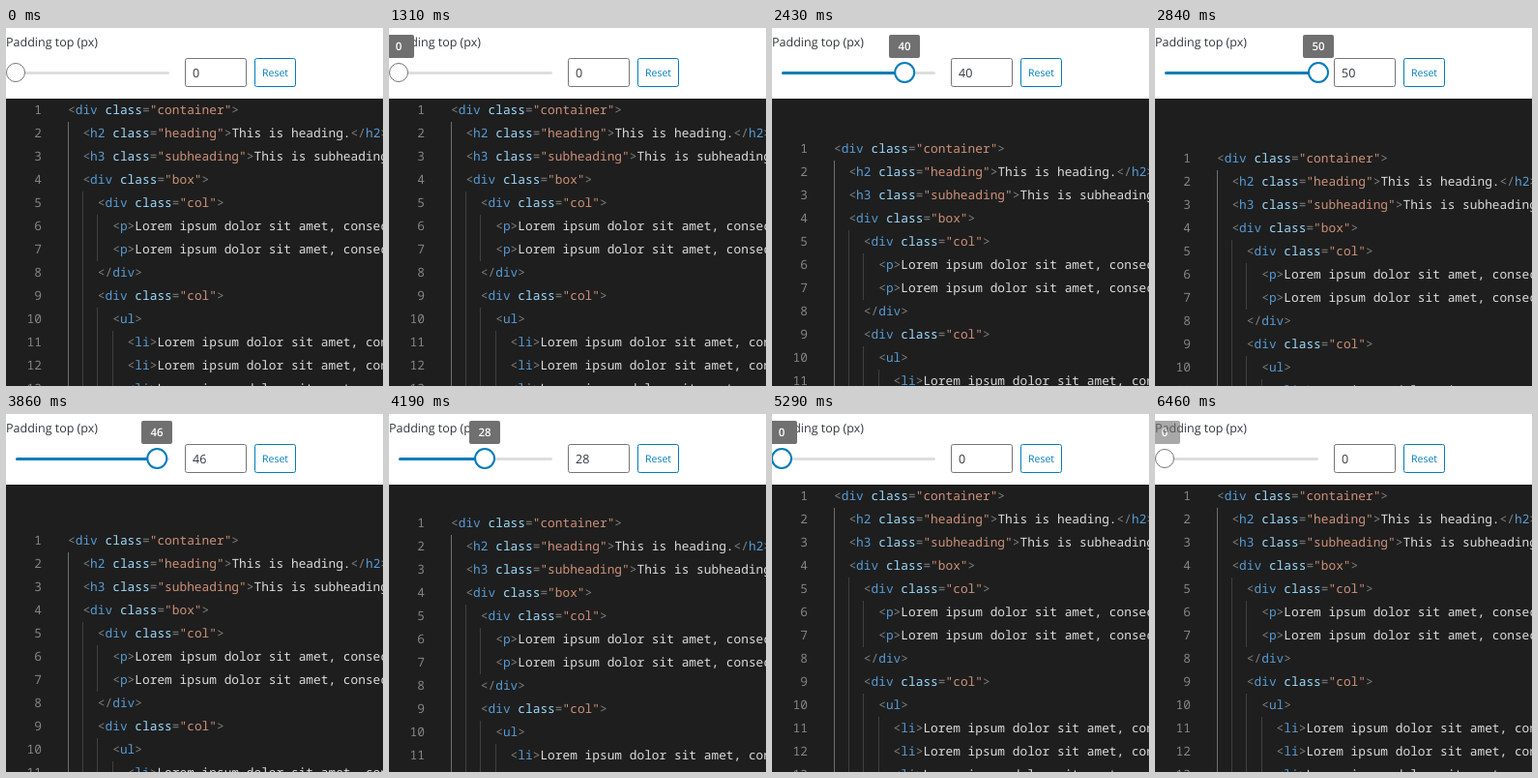
An HTML page for the animation above (6.49 s loop, 390 px wide and 370 px high).

```html
<!DOCTYPE html>
<html lang="en">
<head>
<meta charset="utf-8">
<title>Padding control</title>
<style>
  html, body { margin: 0; width: 100%; height: 100%; overflow: hidden; background: #fff; }
  svg { display: block; text-rendering: geometricPrecision; font: 12.5px "Open Sans", sans-serif; fill: #32373c; }
  #code { font: 12.83px "Noto Sans Mono", monospace; white-space: pre; }
  .num { fill: #858585; text-anchor: end; }
  .punct { fill: #808080; }
  .tag { fill: #569cd6; }
  .attr { fill: #9cdcfe; }
  .str { fill: #ce9178; }
  .text { fill: #dcdcdc; }
  .guide { fill: #404040; }
  .active { fill: #707070; }
  #tip text { font-size: 11.5px; font-weight: 600; fill: #fff; text-anchor: middle; }
</style>
</head>
<body>
<svg width="390" height="370" viewBox="0 0 390 370">
  <text x="0" y="19">Padding top (px)</text>

  <rect x="10" y="45" width="159" height="3" rx="1.5" fill="#ddd"/>
  <rect id="fill" x="10" y="45" height="3" rx="1.5" fill="#007cba"/>
  <circle id="thumb" cy="46" fill="#fff"/>

  <rect x="185.5" y="31.5" width="63" height="29" rx="2" fill="#fff" stroke="#757575"/>
  <text id="field" x="193" y="51"></text>
  <rect x="257.5" y="31.5" width="42" height="29" rx="2" fill="#fff" stroke="#007cba"/>
  <text x="265" y="50" font-size="10.5" style="fill:#007cba">Reset</text>

  <g id="tip">
    <rect x="-16" y="7" width="32" height="24" rx="2" fill="#707070"/>
    <text id="tipText" x="0" y="23"></text>
  </g>

  <rect y="73" width="390" height="297" fill="#1e1e1e"/>
  <g id="code"></g>
</svg>
<script>
const LOOP = 6490, ROW = 24, LEFT = 64, INDENT = 15.4;
const lorem = "Lorem ipsum dolor sit amet, consectetur";
const lines = [
  [0, '<div class="container">'],
  [1, '<h2 class="heading">This is heading.</h2>'],
  [1, '<h3 class="subheading">This is subheading.</h3>'],
  [1, '<div class="box">'],
  [2, '<div class="col">'],
  [3, `<p>${lorem}</p>`],
  [3, `<p>${lorem}</p>`],
  [2, '</div>'],
  [2, '<div class="col">'],
  [3, '<ul>'],
  [4, `<li>${lorem}</li>`],
  [4, `<li>${lorem}</li>`],
  [4, `<li>${lorem}</li>`]
];

const $ = id => document.getElementById(id);
const code = $("code"), fill = $("fill"), thumb = $("thumb"), tip = $("tip");

function add(parent, name, attrs, text = "") {
  const el = document.createElementNS("http://www.w3.org/2000/svg", name);
  for (const key in attrs) el.setAttribute(key, attrs[key]);
  el.textContent = text;
  return parent.appendChild(el);
}

const kinds = ["punct", "tag", "attr", "str", "text"];
const tokens = /(<\/?|>|=)|(?<=<\/?)(\w+)|( class(?==))|(".*?")|([^<>="]+)/g;

lines.forEach(([depth, html], i) => {
  const top = 73 + i * ROW, base = top + 16;
  for (let k = 0; k < depth; k++) {
    add(code, "rect", {
      class: k ? "guide" : "active",
      x: Math.floor(LEFT + k * INDENT), y: top, width: 1, height: ROW
    });
  }
  add(code, "text", { class: "num", x: 37, y: base }, i + 1);
  const row = add(code, "text", { x: LEFT + depth * INDENT, y: base });
  for (const [token, ...groups] of html.matchAll(tokens)) {
    add(row, "tspan", { class: kinds[groups.findIndex(Boolean)] }, token);
  }
});

// Drag path: [ms, slider value]
const drag = [
  [0, 0], [1589, 0], [1590, 1], [1870, 18], [1970, 18], [2150, 33], [2249, 33],
  [2250, 34], [2430, 40], [2510, 40], [2840, 50], [3809, 50], [3810, 49],
  [4190, 28], [4270, 28], [4420, 20], [4499, 20], [4500, 19], [4880, 9],
  [4930, 9], [5110, 2], [5239, 2], [5240, 1], [5289, 1], [5290, 0], [LOOP, 0]
];
// Tooltip fade: [from ms, opacity]
const fade = [[0, 0], [1230, .3], [1270, .7], [1310, 1], [6410, .85], [6460, .6]];

function valueAt(t) {
  const i = drag.findIndex(([end]) => end > t);
  const [t0, v0] = drag[i - 1], [t1, v1] = drag[i];
  return Math.round(v0 + (v1 - v0) * (t - t0) / (t1 - t0));
}

function draw(t) {
  const value = valueAt(t), x = 10 + value / 50 * 159;
  const focused = t >= 1590 && t < 6410;
  fill.setAttribute("width", x - 10);
  thumb.setAttribute("cx", x);
  thumb.setAttribute("r", focused ? 10 : 9.5);
  thumb.setAttribute("stroke", focused ? "#007cba" : "#757575");
  thumb.setAttribute("stroke-width", focused ? 2 : 1);
  $("field").textContent = $("tipText").textContent = value;
  tip.setAttribute("transform", `translate(${Math.round(x)})`);
  tip.setAttribute("opacity", fade.findLast(([from]) => from <= t)[1]);
  code.setAttribute("transform", `translate(0 ${value})`);
}

const start = performance.now();
function tick() {
  draw((performance.now() - start) % LOOP);
  requestAnimationFrame(tick);
}
draw(0);
requestAnimationFrame(tick);
</script>
</body>
</html>
```
